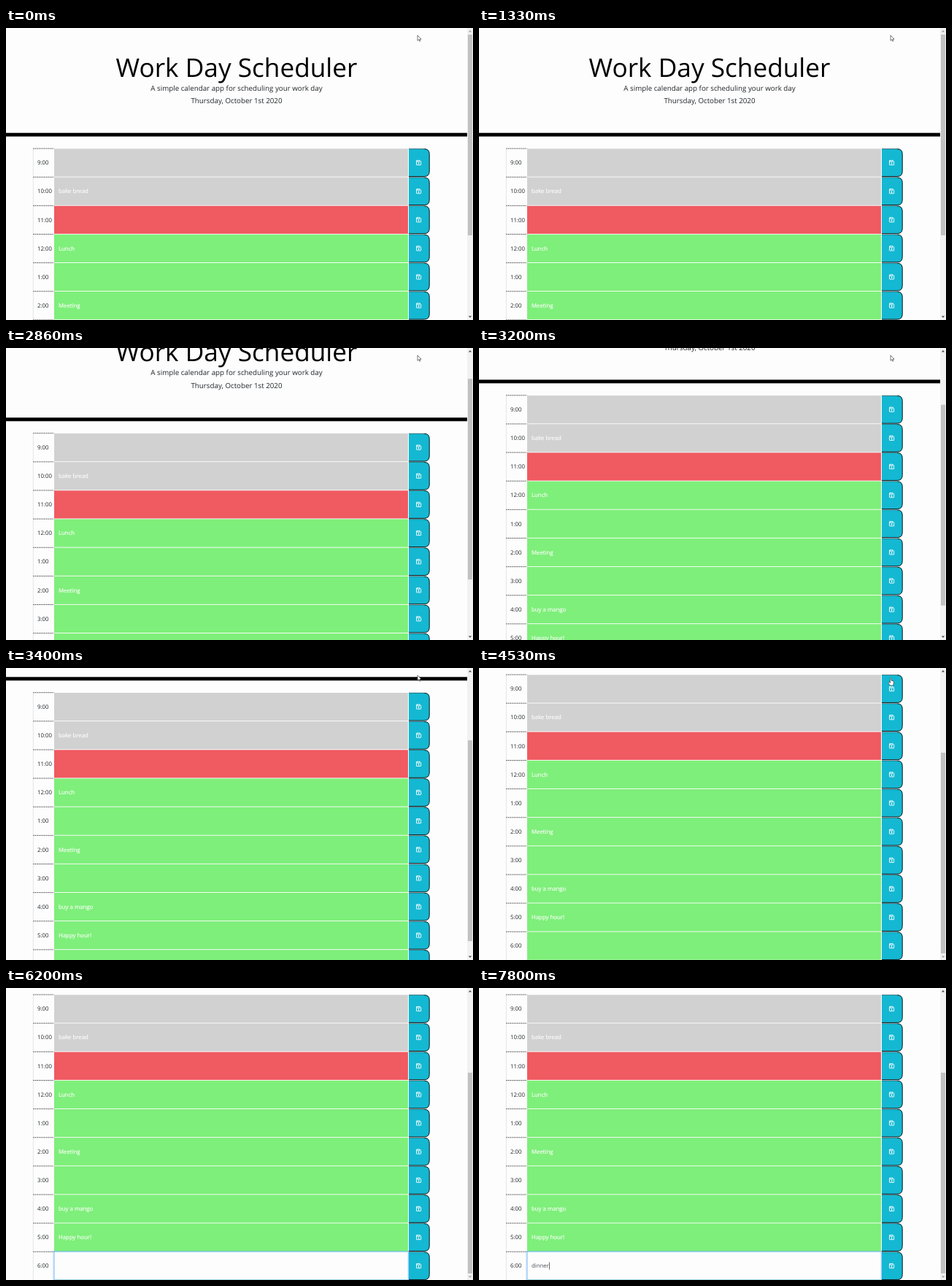
Animation, 640 px wide and 400 px high, one loop 8000 ms. Source, as an HTML page:

```html
<!DOCTYPE html>
<html lang="en">
<head>
<meta charset="utf-8">
<title>Work Day Scheduler</title>
<style>
  html, body { margin: 0; width: 100%; height: 100%; overflow: hidden; background: #fdfdfd; }
  svg { display: block; width: 640px; height: 400px; }
  text {
    font-family: "Open Sans", sans-serif; font-size: 7.82px; fill: #212529;
    white-space: pre; text-rendering: geometricPrecision;
  }
  .middle { text-anchor: middle; }
  .title { font-size: 35.2px; fill: #000; }
  .lead { font-size: 9.78px; }
  .note { fill: #fdfdfd; stroke: #fdfdfd; stroke-width: .15; }
  .past { fill: #d1d1d1; }
  .present { fill: #f05a61; }
  .future { fill: #7eef7a; }
  .dash { stroke: #111; stroke-width: .8; stroke-dasharray: 1.5 1; }
  .save { fill: #14b8d2; }
  .edge { fill: none; stroke: #10181b; }
</style>
</head>
<body>
<svg viewBox="0 0 640 400">
  <defs>
    <g id="disk" fill="none" stroke="#fff" stroke-width=".9">
      <path d="M-2.9-3.1H1.5L3.1-1.5V2.7Q3.1 3.1 2.7 3.1H-2.7Q-3.1 3.1-3.1 2.7V-2.9Z"/>
      <path d="M-1.7-3V-1H1.2V-3"/>
      <circle cy="1.1" r=".9" fill="#fff" stroke="none"/>
    </g>
    <g id="button">
      <path class="save" d="M552 .5H573.2Q580.4.5 580.4 7.7V31.3Q580.4 38.6 573.2 38.6H552Z"/>
      <path class="edge" stroke-width=".5" d="M552 .6H573.2"/>
      <path class="edge" stroke-width="1" d="M573.2.7Q580.2.7 580.2 7.7V31.3Q580.2 38.4 573.2 38.4H552"/>
      <use href="#disk" x="565.6" y="19.5"/>
    </g>
  </defs>
  <rect width="640" height="400" fill="#fdfdfd"/>
  <g id="page">
    <text class="middle title" x="316" y="66.8">Work Day Scheduler</text>
    <text class="middle lead" x="316" y="85.7">A simple calendar app for scheduling your work day</text>
    <text class="middle lead" x="316" y="103.3">Thursday, October 1st 2020</text>
    <rect y="143.7" width="632" height="4.9"/>
    <g id="rows"></g>
  </g>
  <rect x="632" width="8" height="400" fill="#f1f1f1"/>
  <rect id="thumb" x="633" y="9" width="6" height="275" fill="#c1c1c1"/>
  <path id="up" d="M633.8 5.4H638.2L636 3.1Z"/>
  <path id="down" d="M633.8 394.6H638.2L636 396.9Z"/>
  <g id="cursor" stroke="#222" stroke-width=".6" stroke-linejoin="round" fill="#fff">
    <path id="arrow" d="M0 0V7.3L1.7 5.8L2.8 8.2L3.9 7.7L2.8 5.3H5Z"/>
    <path id="hand" d="M-.4.6Q.4-.6 1.2.6V3.4L4.3 4.2Q4.8 4.5 4.6 6.2L3.7 10.2H-.7L-3 6.2Q-3 5-1.7 5.5L-.4 6.6Z"/>
    <path id="beam" d="M-1.3-4H1.3M0-4V4M-1.3 4H1.3" fill="none"/>
  </g>
</svg>
<script>
const LOOP = 8000, STEP = 200 / 3;
const ROW_TOP = 165, PITCH = 39.13, MAX_SCROLL = 156;
const CLICK = 5660, BLINK = 535;
const KEY_TIMES = [6930, 7130, 7330, 7460, 7600, 7800];
const WORD = "dinner";
const schedule = [
  ["9:00", ""], ["10:00", "bake bread"], ["11:00", ""], ["12:00", "Lunch"], ["1:00", ""],
  ["2:00", "Meeting"], ["3:00", ""], ["4:00", "buy a mango"], ["5:00", "Happy hour!"], ["6:00", ""]
];
const scrollPath = [[2533, 0], [2600, .7], [2667, 10], [2867, 48.4], [3400, 131.4], [3533, MAX_SCROLL]];
const cursorX = [[4530, 564], [4800, 555], [5330, 335], [5460, 325], [5660, 325], [6000, 345]];
const cursorY = [[3400, 10], [3530, 12.3], [4530, 12.3], [4800, 130], [5330, 372], [5460, 380], [5660, 380], [6000, 412]];

const $ = id => document.getElementById(id);
const show = (id, visible) => $(id).style.display = visible ? "" : "none";

const kindOf = i => i < 2 ? "past" : i === 2 ? "present" : "future";

function rowMarkup([hour, note], i) {
  const last = i === schedule.length - 1;
  const focus = last ? `
    <g id="focus">
      <rect x="65.3" y="-.4" width="486.4" height="39.6" fill="none" stroke="#007bff" stroke-opacity=".28" stroke-width="1.7"/>
      <rect x="66.2" y=".5" width="484.8" height="37.8" fill="#fdfdfd" stroke="#80bdff" stroke-width=".5"/>
      <text id="typed" x="72" y="22.3" style="fill:#495057"></text>
      <rect id="caret" y="14.4" width=".7" height="10.2" fill="#333"/>
    </g>` : "";
  return `<g transform="translate(0 ${ROW_TOP + i * PITCH})">
    <path d="M37.3 0V39.1" stroke="#d2d2d2" stroke-width=".6"/>
    <path class="dash" d="M37.3 .1H65.5"/>
    <text x="43" y="22.3">${hour}</text>
    <rect class="${kindOf(i)}" x="66" y=".4" width="485" height="38.2"/>
    <text class="note" x="72" y="22.3">${note}</text>${focus}
    <use href="#button"/>
  </g>`;
}
$("rows").innerHTML = schedule.map(rowMarkup).join("");

// Linear interpolation through [time, value] points, held at both ends.
function track(points, t) {
  if (t <= points[0][0]) return points[0][1];
  for (let i = 1; i < points.length; i++) {
    const [t0, v0] = points[i - 1], [t1, v1] = points[i];
    if (t < t1) return v0 + (v1 - v0) * (t - t0) / (t1 - t0);
  }
  return points[points.length - 1][1];
}

function drawScroll(t) {
  const scroll = track(scrollPath, t);
  $("page").setAttribute("transform", `translate(0 ${-scroll})`);
  $("thumb").setAttribute("y", 9 + scroll / MAX_SCROLL * 107);
  $("up").setAttribute("fill", scroll > 0 ? "#505050" : "#a3a3a3");
  $("down").setAttribute("fill", scroll < MAX_SCROLL ? "#505050" : "#a3a3a3");
  return scroll;
}

function drawCursor(t, scroll) {
  const x = track(cursorX, t), y = track(cursorY, t);
  const overRows = y > ROW_TOP - scroll;
  $("cursor").setAttribute("transform", `translate(${x} ${y})`);
  show("cursor", t < 6000);
  show("arrow", !overRows);
  show("hand", overRows && x > 551);
  show("beam", overRows && x <= 551);
}

function drawInput(t) {
  const count = KEY_TIMES.filter(k => t >= k).length;
  const typed = $("typed");
  show("focus", t >= CLICK);
  typed.textContent = WORD.slice(0, count);
  $("caret").setAttribute("x", 72.2 + (count ? typed.getComputedTextLength() : 0));
  show("caret", count > 0 || Math.floor((t - CLICK) / BLINK) % 2 === 0);
}

const start = performance.now();
function frame() {
  const elapsed = Math.max(0, performance.now() - start) % LOOP;
  const t = Math.floor((elapsed + 7) / STEP) * STEP;
  const scroll = drawScroll(t);
  drawCursor(t, scroll);
  drawInput(t);
  requestAnimationFrame(frame);
}
frame();
</script>
</body>
</html>
```
